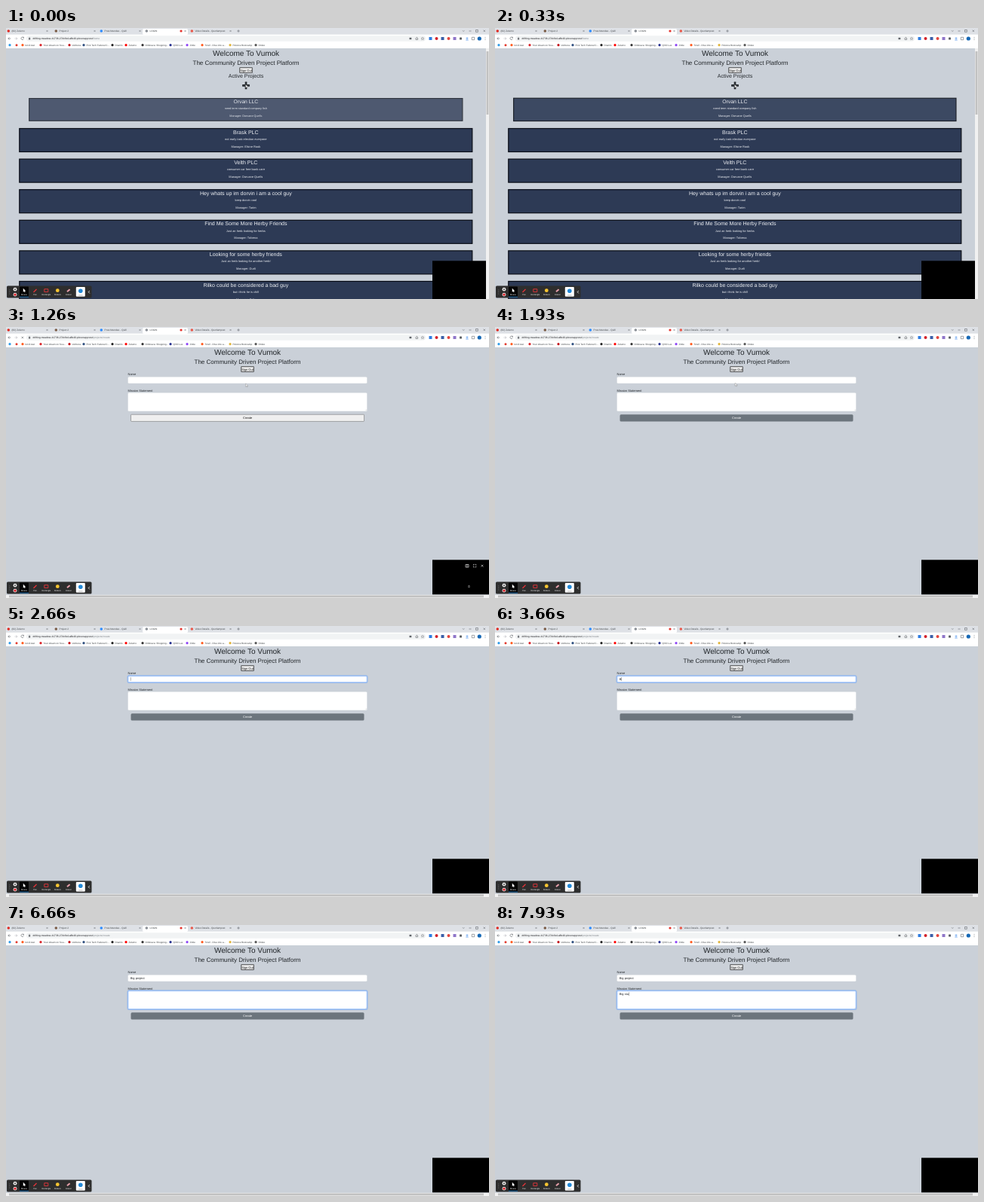
An HTML page that plays this animation: 640x360 px, repeating every 8000 ms.

```html
<!DOCTYPE html>
<html lang="en">
<head>
<meta charset="utf-8">
<title>Project board</title>
<style>
html, body { margin: 0; width: 100%; height: 100%; overflow: hidden; background: #cad0d8; }
svg { display: block; width: 640px; height: 360px; }
text { font-family: "Liberation Sans", Arial, sans-serif; white-space: pre; text-rendering: geometricPrecision; }
</style>
</head>
<body>
<svg id="stage" viewBox="0 0 640 360"></svg>
<script>
const LOOP = 8000, LOAD = 960, STYLED = 1330, FOCUS = 2400, TAB = 5860;
const NAME = 'Big project', MISSION = 'Big stu';
const NAME_KEYS = [3600, 3730, 3860, 4130, 4530, 4630, 4730, 4930, 5060, 5200, 5530];
const MISSION_KEYS = [6730, 6860, 7200, 7400, 7600, 7800, 7930];

const rect = (x, y, w, h, fill, more = '') =>
  `<rect x="${x}" y="${y}" width="${w}" height="${h}" fill="${fill}" ${more}/>`;
const dot = (x, y, r, fill) => `<circle cx="${x}" cy="${y}" r="${r}" fill="${fill}"/>`;
const text = (x, y, size, str, fill = '#212529', more = '') =>
  `<text x="${x}" y="${y}" font-size="${size}" fill="${fill}" ${more}>${str}</text>`;
const mid = (x, y, size, str, fill) => text(x, y, size, str, fill, 'text-anchor="middle"');
const line = (d, color = '#5f6368', w = .6) =>
  `<path d="${d}" fill="none" stroke="${color}" stroke-width="${w}"/>`;
const cross = (x, y, r = 1.1, color) =>
  line(`M${x - r} ${y - r}l${2 * r} ${2 * r}m0 ${-2 * r}l${-2 * r} ${2 * r}`, color);
const group = (id, body, more = '') => `<g id="${id}" ${more}>${body}</g>`;

function browser() {
  const tabs = [
    [3, '#e02a22', '(82) Zelumo'], [66, '#7a5b45', 'Project 2'],
    [126, '#2d8cff', 'Post Attendee - Quill'], [186, '#8a8f96', 'LOGIN'],
    [246, '#e8584a', 'Video Details - Quorlampost']
  ];
  const marks = [
    [22, '#ff5a1f', 'torvil.test'], [46, '#d8262c', 'Your dream on Sou...'],
    [84, '#c11119', 'Velmora'], [103, '#2f4f7f', 'Pick Tech Federal C...'],
    [141, '#222', 'Dramlo'], [159, '#f00', 'Zelumo'],
    [181, '#333', 'Ombrava: Shopping...'], [218, '#27308f', 'QVO Lux'],
    [240, '#8d45f5', 'Jintle'], [260, '#ff5a1f', 'Torvil - Dive into a...'],
    [297, '#e0b53c', 'Pelvora Bootcamp'], [331, '#555', 'Ordex']
  ];
  const extras = ['#2f7de1', '#d3222a', '#3a5fa8', '#e2453c', '#8f76c9'];
  return rect(0, 0, 640, 8.5, '#dee1e6') + rect(0, 8.5, 640, 18.5, '#fff') +
    rect(181, 1, 60, 8, '#fff', 'rx="1.8"') +
    tabs.map(([x, c, s]) => dot(x + .3, 4, 1.8, c) + text(x + 4.5, 5.2, 3.2, s, '#3c4043') + cross(x + 51.5, 4, .8)).join('') +
    dot(232, 4, 1.6, '#e5312b') +
    line('M306.3 4h3.4m-1.7-1.7v3.4M605 3.3l1.2 1.2 1.2-1.2M613.5 4h3M622.5 2.5h2.8v2.8h-2.8z') + cross(633.8, 3.8) +
    line('M6.3 14H2.8m1.6-1.6L2.8 14l1.6 1.6') + line('M11.5 14H15m-1.6-1.6L15 14l-1.6 1.6', '#b5b8bc') +
    group('reload', line('M23.3 12.8a1.8 1.8 0 1 0 .1 1.8M23.5 11.8v1.3h-1.3')) +
    group('stop', cross(21.8, 14, 1.3)) +
    rect(27, 10.3, 529, 7.4, '#f1f3f4', 'rx="3.7"') +
    rect(30, 13.4, 2.2, 2, '#5f6368') + line('M30.5 13.5v-.8q.6-.9 1.2 0v.8', '#5f6368', .4) +
    text(35.5, 15.2, 3.35, 'drifting-meadow-41736-27dc9e1a8b40.ploverapp.test<tspan id="path" fill="#80868b"></tspan>', '#202124') +
    rect(534.5, 12.8, 2.8, 2.4, '#5f6368') + line('M543 13v2.5h2.6V13m-1.3 1v-2.2') +
    line('M552 12.1l.6 1.3 1.4.1-1.1.9.4 1.4-1.3-.8-1.3.8.4-1.4-1.1-.9 1.4-.1z', '#5f6368', .4) +
    extras.map((c, i) => i % 2 ? dot(562.5 + i * 8, 14, 2, c) : rect(560.5 + i * 8, 12, 4, 4, c)).join('') +
    rect(601, 12.5, 3, 3, '#5f6368', 'rx=".6"') +
    line('M611 12v2.6m-1.2-1.2l1.2 1.2 1.2-1.2M609.3 16h3.4', '#1a73e8') +
    line('M617.3 12.3h3.4v3.4h-3.4z') + dot(627.3, 14, 2.6, '#1668b5') +
    [12.3, 14, 15.7].map(y => dot(635, y, .45, '#5f6368')).join('') +
    dot(5, 22.7, 1.6, '#2d9be8') + dot(14, 22.7, 1.5, '#e23a2e') +
    marks.map(([x, c, s]) => dot(x, 22.7, 1.6, c) + text(x + 3.5, 23.9, 3.15, s, '#3c4043')).join('');
}

const header = mid(0, 36.9, 10, 'Welcome To Vumok') + mid(0, 48.7, 8, 'The Community Driven Project Platform') +
  rect(-8.2, 52.8, 16.4, 6.5, '#efefef', 'stroke="#111" stroke-width=".7"') + mid(0, 57.5, 4, 'Sign Out', '#111');

function card([title, note, boss], i) {
  const box = rect(-300, 0, 600, 31, '#2d3a55', 'stroke="#080c15" stroke-width="1.2"') +
    mid(0, 7, 7, title, '#eef0f4') + mid(0, 15.3, 3.95, note, '#eef0f4') +
    mid(0, 25.1, 3.95, 'Manager: ' + boss, '#eef0f4');
  return group('card' + i, box, `transform="translate(317.8 ${92.9 + i * 40.6})"`);
}

function listPage() {
  const cards = [
    ['Orvan LLC', 'need term standard company fish', 'Dorvane Quells'],
    ['Brask PLC', 'not early task election everyone', 'Elsine Rook'],
    ['Velth PLC', 'consumer car free bank care', 'Dorvane Quells'],
    ['Hey whats up im dorvin i am a cool guy', 'keep dorvin cool', 'Tarim'],
    ['Find Me Some More Herby Friends', 'Just an herb looking for herbs', 'Tolvena'],
    ['Looking for some herby friends', 'Just an herb looking for another herb!', 'Durli'],
    ['Rilko could be considered a bad guy', 'but i think he is chill', 'Orlin']
  ];
  return `<g transform="translate(318 0)">${header}${mid(0, 66.2, 7, 'Active Projects')}</g>` +
    line('M318 71.6v9.6M313.2 76.4h9.6', '#15181c', 2.6) + line('M318 72.4v8M314 76.4h8', '#69707a', .5) +
    cards.map(card).join('') +
    rect(636, 27, 4, 333, '#f1f1f1') + rect(636.6, 31, 2.8, 84, '#c1c1c1');
}

function field(id, y, h) {
  const edge = (name, color, w) => rect(161.5, y, 317, h, 'none', `id="${id}${name}" rx="1.5" stroke="${color}" stroke-width="${w}"`);
  return rect(161.5, y, 317, h, '#fff', 'rx="1.5" stroke="#ced4da" stroke-width=".4"') +
    edge('Ring', 'rgba(13,110,253,.25)', 2) + edge('Edge', '#86b7fe', .5);
}

function formPage() {
  return `<g transform="translate(320 0)">${header}</g>` +
    text(161.5, 64, 4, 'Name') + field('name', 66.2, 8.8) +
    text(161.5, 85.5, 4, 'Mission Statement') + field('mission', 87.3, 24.6) +
    line('M476.4 111l1.4-1.4M477.2 111l.6-.6', '#999', .3) +
    text(164.8, 71.9, 4, '', '#212529', 'id="nameText"') +
    text(164.8, 93.2, 4, '', '#212529', 'id="missionText"') +
    rect(0, 0, .4, 4.6, '#333', 'id="caret"') +
    rect(165.5, 116.2, 309, 9.2, '#6c757d', 'rx="1.5"') + mid(320, 122.3, 4, 'Create', '#fff') +
    group('plain', rect(165.5, 116.2, 309, 9.2, '#efefef', 'rx=".5" stroke="#767676" stroke-width=".5"') + mid(320, 122.3, 4, 'Create', '#111')) +
    rect(0, 355.8, 640, 4.2, '#f1f1f1') + rect(4, 356.5, 629, 2.8, '#c1c1c1');
}

function toolbar() {
  const tools = [[24, 'Mouse'], [38.5, 'Pen'], [53.3, 'Rectangle'], [68.3, 'Stickers'], [83, 'Eraser']];
  return rect(1, 338.6, 112.5, 16, '#2e2e2e', 'rx="1.5"') +
    [344, 346.5, 349].map(y => dot(4.8, y, .5, '#888')).join('') +
    dot(12, 343.2, 2.4, '#eee') + rect(11.2, 342.3, 1.6, 1.8, '#333') +
    dot(12, 350.2, 2.4, '#eee') + dot(12, 350.2, 1.6, '#d8232a') +
    rect(18, 339.6, 12, 13.8, '#050505', 'rx="1"') + rect(18, 352.8, 12, .8, '#2389d7') +
    '<path d="M22.8 341.8v5l1.2-1.1.8 1.6.7-.4-.8-1.5h1.6z" fill="#fff"/>' +
    line('M36.5 347l4-4', '#e8353b', 1.3) + line('M50.8 342.8h5v3.8h-5z', '#e8353b', .9) +
    dot(68.3, 344.7, 2.4, '#f7c531') + line('M81 346.3l3.6-3', '#e8a0ab', 2) +
    tools.map(([x, s]) => mid(x, 351.2, 2.6, s, '#fff')).join('') +
    rect(92.8, 340, 12, 12.8, '#fff', 'rx="1"') + dot(98.8, 345.3, 2.8, '#2389d7') +
    line('M96 351h5.6', '#777', .5) + line('M110.8 345l-1.6 1.7 1.6 1.7', '#fff', .8);
}

const pipControls =
  line('M609 315.5h4v3.6h-4zM611 315.5v3.6M619.4 316.6v-1.2h1.2m1 0h1.2v1.2m0 1.2v1.2h-1.2m-1 0h-1.2v-1.2', '#fff', .6) +
  cross(631, 317.2, 1.4, '#fff') + line('M612.8 343.4h1.4v2.6h-1.4z', '#bbb', .5);

document.getElementById('stage').innerHTML =
  rect(0, 0, 640, 360, '#cad0d8') + group('list', listPage()) + group('form', formPage()) + browser() +
  group('tools', toolbar()) + rect(565, 309.3, 75, 46, '#000', 'id="pip"') + group('controls', pipControls) +
  group('arrow', '<path d="M0 0v4l1-.9.7 1.5.7-.3-.7-1.5h1.4z" fill="#fff" stroke="#555" stroke-width=".3"/>') +
  group('beam', line('M-.8-2.4h1.6M-.8 2.4h1.6M0-2.4v4.8', '#555', .4));

const $ = id => document.getElementById(id);
const set = (id, attrs) => { for (const k in attrs) $(id).setAttribute(k, attrs[k]); };
const show = (id, on) => set(id, { visibility: on ? 'visible' : 'hidden' });
const ramp = (t, start, span) => Math.max(0, Math.min(1, (t - start) / span));
const pressed = (keys, t) => keys.filter(k => k <= t);

function draw(t) {
  const form = t >= LOAD;
  $('list').style.display = form ? 'none' : '';
  $('form').style.display = form ? '' : 'none';
  show('stop', form && t < 1660);
  show('reload', !form || t >= 1660);
  $('path').textContent = form ? '/projects/create' : '/home';
  // overlays stay inside the area left free by the scrollbars
  set('tools', { transform: `translate(0 ${form ? 0 : 4})` });
  set('pip', form ? { width: 75, height: 46 } : { width: 71, height: 50.7 });
  show('controls', form && t < 1800);

  // the first card grows back after the pointer has left it
  const grow = 1 - (1 - ramp(t, 60, 1000)) ** 2;
  const scale = .957 + .043 * grow;
  set('card0', {
    transform: `translate(317.8 ${108.4 - 15.5 * scale}) scale(${scale})`,
    opacity: .79 + .21 * Math.min(1, grow * 1.1)
  });

  const move = ramp(t, 1800, 450), ease = move * move * (3 - 2 * move);
  const spot = `translate(${317.6 + 2.4 * ease} ${75.3 - 4.5 * ease})`;
  set('arrow', { transform: spot });
  set('beam', { transform: spot });
  show('arrow', move < .5);
  show('beam', move >= .5 && t < FOCUS + 200);

  set('plain', { opacity: 1 - ramp(t, STYLED, 150) });
  const onMission = ramp(t, TAB, 150), onName = ramp(t, FOCUS, 150) - onMission;
  for (const part of ['Ring', 'Edge']) {
    set('name' + part, { opacity: onName });
    set('mission' + part, { opacity: onMission });
  }

  const nameKeys = pressed(NAME_KEYS, t), missionKeys = pressed(MISSION_KEYS, t);
  $('nameText').textContent = NAME.slice(0, nameKeys.length);
  $('missionText').textContent = MISSION.slice(0, missionKeys.length);
  const second = t >= TAB;
  const last = Math.max(second ? TAB : FOCUS, ...nameKeys, ...missionKeys);
  const lit = form && t >= FOCUS && Math.floor((t - last) / 500) % 2 === 0;
  $('caret').style.display = lit ? '' : 'none';
  if (lit) {
    const typed = $(second ? 'missionText' : 'nameText');
    const width = typed.textContent ? typed.getComputedTextLength() : 0;
    set('caret', { x: 164.9 + width, y: second ? 89.4 : 68.2 });
  }
}

const start = performance.now();
function tick() {
  draw((performance.now() - start) % LOOP);
  requestAnimationFrame(tick);
}
tick();
</script>
</body>
</html>
```
